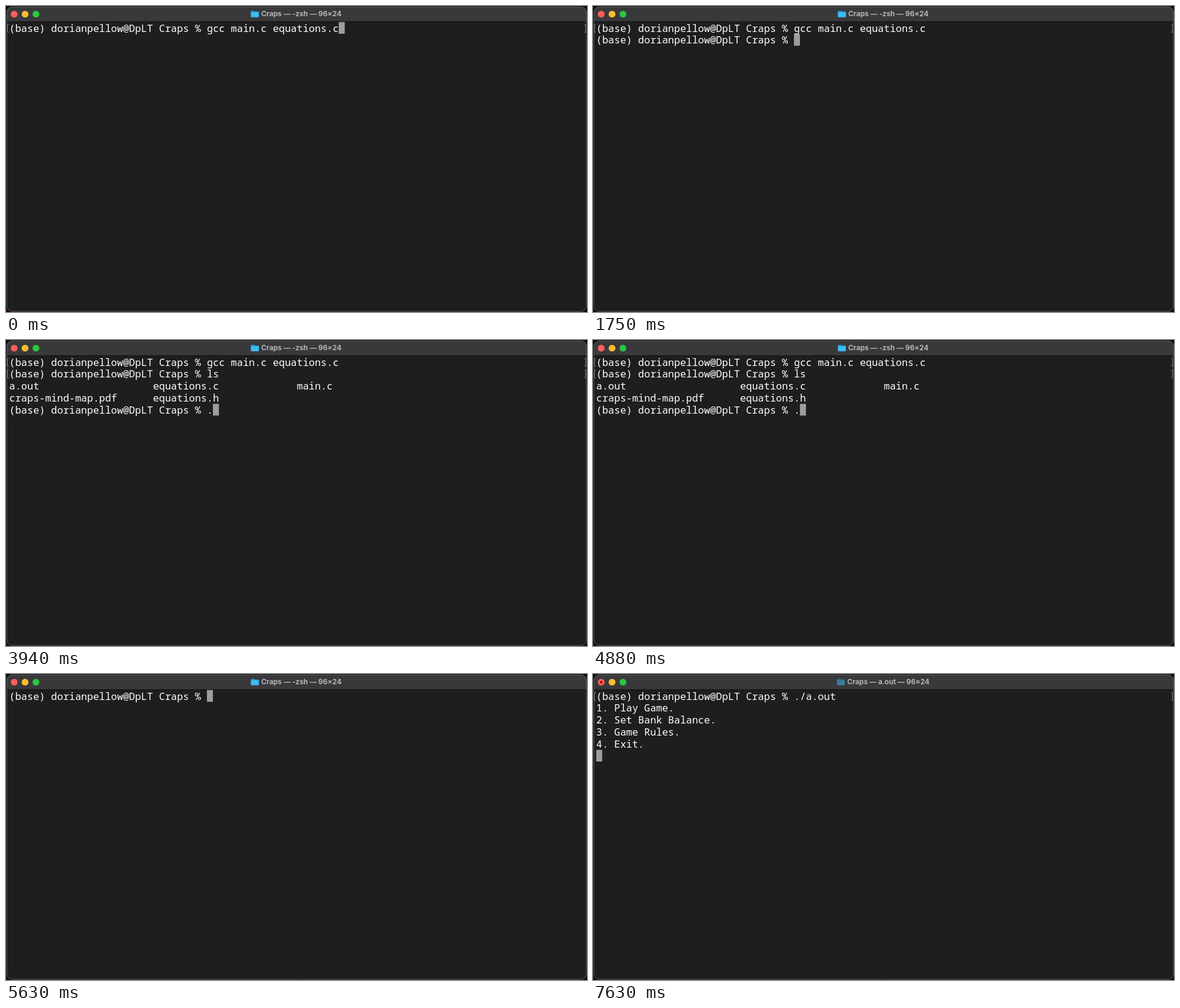
An HTML page with a canvas that plays this animation: 960 by 507 pixels, repeating every 8 s.

```html
<!DOCTYPE html>
<html lang="en">
<head>
<meta charset="utf-8">
<title>Terminal</title>
<style>
  html, body { margin: 0; width: 100%; height: 100%; overflow: hidden; background: #0b0b0c; }
  canvas { display: block; }
</style>
</head>
<body>
<canvas width="960" height="507"></canvas>
<script>
const ctx = document.querySelector('canvas').getContext('2d');
const LOOP = 8000;
const LEFT = 5.3, TOP = 26.6, CELL = 9.9, ROW = 19.8;
const MONO = '500 16.5px "Noto Sans Mono", monospace';
const TITLE = '700 11.7px Inter, "DejaVu Sans", sans-serif';

const prompt = '(base) dorianpellow@DpLT Craps % ';
const compile = prompt + 'gcc main.c equations.c';
const listing = [
  compile,
  prompt + 'ls',
  'a.out'.padEnd(24) + 'equations.c'.padEnd(24) + 'main.c',
  'craps-mind-map.pdf'.padEnd(24) + 'equations.h'
];
const run = prompt + './a.out';
const menu = ['1. Play Game.', '2. Set Bank Balance.', '3. Game Rules.', '4. Exit.'];

// Each state inherits from the one before; the cursor sits after the last line.
const states = [{ time: 0, lines: [compile], marks: 1, job: '-zsh', busy: false }];
const at = (time, change) => states.push({ ...states.at(-1), time, ...change });
const type = (above, word, times) => times.forEach((time, i) =>
  at(time, { lines: [...above, prompt + word.slice(0, i + 1)] }));

at(940, { lines: [compile, ''] });
at(1060, { job: 'clang ◂ clang main.c equations.c', busy: true });
at(1440, { lines: [compile, prompt] });
at(1500, { job: '-zsh', busy: false });
type([compile], 'ls', [2380, 2440]);
at(2560, { lines: [...listing.slice(0, 2), ''], marks: 2 });
at(2630, { lines: [...listing, prompt] });
type(listing, './', [3940, 4060]);
at(4880, { lines: [...listing, prompt + '.'] });
at(5000, { lines: [...listing, prompt] });
type(listing, 'clear', [5190, 5250, 5310, 5380, 5500]);
at(5630, { lines: [prompt], marks: 0 });
type([], './a.out', [6310, 6380, 6440, 6560, 6750, 6880, 7000]);
at(7310, { lines: [run, ''], marks: 1 });
at(7380, { job: 'a.out', busy: true });
at(7630, { lines: [run, ...menu, ''] });

function box(x, y, w, h, color, radius = 0) {
  ctx.fillStyle = color;
  ctx.beginPath();
  ctx.roundRect(x, y, w, h, radius);
  ctx.fill();
}

function disc(x, y, r, color) {
  ctx.fillStyle = color;
  ctx.beginPath();
  ctx.arc(x, y, r, 0, 2 * Math.PI);
  ctx.fill();
}

function bracket(x, y, tick) {
  ctx.beginPath();
  ctx.moveTo(x + tick, y);
  ctx.lineTo(x, y);
  ctx.lineTo(x, y + 13);
  ctx.lineTo(x + tick, y + 13);
  ctx.stroke();
}

function drawWindow() {
  box(0, 0, 960, 507, '#0b0b0c');
  box(0, 502, 1, 5, '#7a1f5c');
  box(1, 1, 958.5, 505.5, '#1e1e1e', 9);
  box(1, 1, 958.5, 25, '#39393b', [9, 9, 0, 0]);
  box(1, 25.5, 958.5, 1, '#0c0c0c');
  ctx.strokeStyle = '#5c5c5e';
  ctx.lineWidth = 1;
  ctx.beginPath();
  ctx.roundRect(1.5, 1.5, 957.5, 504.5, 9);
  ctx.stroke();
}

function drawTitle({ job, busy }) {
  ['#ff5f57', '#febc2e', '#28c840'].forEach((color, i) => disc(13.5 + 18 * i, 13.5, 5.6, color));
  if (busy) disc(13.5, 13.5, 1.9, '#7c0d0a');

  const text = `Craps — ${job} — 96×24`;
  ctx.font = TITLE;
  const x = 479.5 - (ctx.measureText(text).width + 17) / 2;
  box(x, 8, 6, 4, busy ? '#2f6988' : '#1b98d3', 1);
  box(x, 9, 13, 9.5, busy ? '#2f6988' : '#1b98d3', 1.2);
  box(x, 10.5, 13, 8, busy ? '#397c9f' : '#3ebcf3', 1.2);
  ctx.fillStyle = '#b5b5b8';
  ctx.fillText(text, x + 17, 17.3);
}

function drawText({ lines, marks }) {
  ctx.strokeStyle = '#747474';
  for (let row = 0; row < marks; row++) {
    const y = Math.round(TOP + row * ROW) + 3.5;
    bracket(2.5, y, 2.5);
    bracket(957.5, y, -2.5);
  }
  const last = lines.length - 1;
  box(LEFT + lines[last].length * CELL, TOP + last * ROW, CELL, 19.4, '#9d9d9d');
  ctx.font = MONO;
  ctx.fillStyle = '#fff';
  lines.forEach((line, row) => ctx.fillText(line, LEFT, TOP + row * ROW + 15.9));
}

function draw() {
  const time = performance.now() % LOOP;
  const state = states.findLast(s => s.time <= time);
  drawWindow();
  drawTitle(state);
  drawText(state);
  requestAnimationFrame(draw);
}
draw();
</script>
</body>
</html>
```
